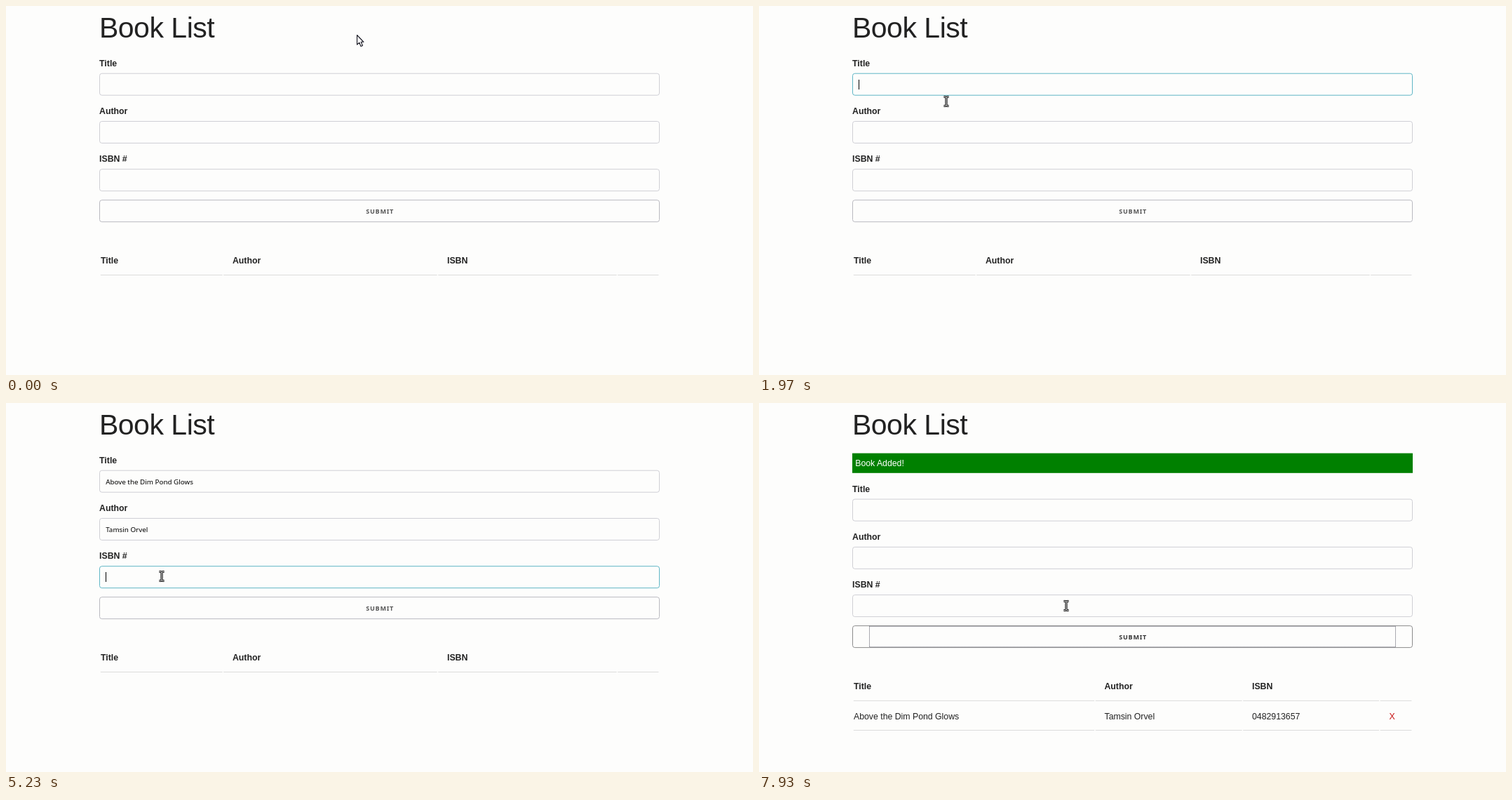
These frames come from a looping animation (1065 px wide and 526 px high, 8 s). An HTML page:

```html
<!DOCTYPE html>
<html lang="en">
<head>
<meta charset="utf-8">
<title>Book List</title>
<style>
  html, body { margin: 0; width: 100%; height: 100%; overflow: hidden; background: #fdfdfc; }
  svg { display: block; width: 1065px; height: 526px; }
  text { font: 12.29px "Liberation Sans", Arial, sans-serif; fill: #222; white-space: pre; }
  .heading { font-size: 40.96px; letter-spacing: -.45px; }
  .bold { font-weight: 700; }
  .value { font: 9.83px "Noto Sans", sans-serif; fill: #000; }
  .option { font: 10.1px "Noto Sans", sans-serif; }
  .button { font: 600 9.01px "Noto Sans", sans-serif; letter-spacing: .82px; }
  .box { fill: none; stroke: #cfcfd5; }
  .rule { stroke: #dcdcdc; fill: none; }
  .popup { filter: drop-shadow(0 2px 2.5px rgba(40, 40, 70, .6)); }
</style>
</head>
<body>
<svg id="stage" viewBox="0 0 1065 526" xmlns="http://www.w3.org/2000/svg"></svg>
<script>
const DURATION = 8000;
const PITCH = 68.25, SHIFT = 40.9;
const LEFT = 133.5, WIDTH = 798, FIELD_TOP = 96.2, FIELD_HEIGHT = 31;
const BUTTON_TOP = 276.7;
const ADDED = 7900, PRESSED = 7870;

const fields = [
  { label: 'Title', value: 'Above the Dim Pond Glows', focus: 830, open: 1430, close: 1930, filled: 2000 },
  { label: 'Author', value: 'Tamsin Orvel', focus: 3300, open: 3770, close: 4250, filled: 4270 },
  { label: 'ISBN #', value: '0482913657', focus: 5230, open: 5470, close: 6530, filled: 6530 }
];

// Moments at which the caret's blinking starts over
const caretResets = [830, 1400, 1930, 2000, 3300, 3730, 4270, 5230, 5400, 5900, 6530];

// Pointer moves: start, end, target x, target y
const moves = [
  [30, 760, 366.5, 107], [930, 1100, 303.5, 115], [1430, 1730, 267, 136],
  [2500, 3230, 249.5, 184.5], [3770, 4000, 240, 206], [4470, 5030, 222, 247],
  [5470, 5970, 238.5, 275], [6830, 7600, 438, 289]
];
const pointerStart = [500.5, 41.5];
// While it rests on a suggestion the pointer keeps its text shape
const heldBeam = [[1330, 2500], [3670, 4470], [5230, 6830]];

const stage = document.getElementById('stage');
const fieldTop = i => FIELD_TOP + i * PITCH;
const within = (t, from, to) => t >= from && t < to;
const show = (node, on) => node.setAttribute('visibility', on ? 'inherit' : 'hidden');

function add(parent, tag, attrs = {}, text = '') {
  const node = document.createElementNS(stage.namespaceURI, tag);
  for (const key in attrs) node.setAttribute(key, attrs[key]);
  node.textContent = text;
  return parent.appendChild(node);
}
const write = (parent, x, y, text, cls = '') => add(parent, 'text', { x, y, class: cls }, text);
const box = (parent, y) =>
  add(parent, 'rect', { x: LEFT, y, width: WIDTH, height: FIELD_HEIGHT, rx: 3.2, class: 'box' });

write(stage, 132.9, 45.3, 'Book List', 'heading');

const alertBar = add(stage, 'g');
add(alertBar, 'rect', { x: 133, y: 71.6, width: 799, height: 28.2, fill: '#008000' });
write(alertBar, 137.2, 90, 'Book Added!').style.fill = '#fff';

const page = add(stage, 'g');
fields.forEach((field, i) => {
  const y = fieldTop(i);
  write(page, 133.1, y - 10.4, field.label, 'bold');
  field.box = box(page, y);
  field.text = write(page, 142.2, y + 19.3, field.value, 'value');
});

const button = box(page, BUTTON_TOP);
const buttonText = write(page, 533.1, 296.3, 'SUBMIT', 'button');
buttonText.setAttribute('text-anchor', 'middle');
const focusRing = add(page, 'rect', {
  x: 157.5, y: BUTTON_TOP + .8, width: 750, height: 29.4,
  fill: 'none', stroke: '#445', 'stroke-width': .9, 'stroke-dasharray': '1 1'
});

function table(edges, row) {
  const group = add(page, 'g');
  const columns = edges.slice(0, -1);
  const rule = y => columns.forEach((x, i) =>
    add(group, 'path', { d: `M${x} ${y}H${edges[i + 1] - 1.6}`, class: 'rule' }));
  ['Title', 'Author', 'ISBN'].forEach((name, i) =>
    write(group, columns[i] + (i ? 12.8 : .2), 367, name, 'bold'));
  rule(383.5);
  if (row) {
    row.forEach((cell, i) => write(group, columns[i] + (i ? 12.8 : .2), 409.7, cell));
    group.lastChild.style.fill = '#c81414';
    rule(425.6);
  }
  return group;
}
const emptyTable = table([134.8, 310.2, 616.2, 872.2, 932]);
const filledTable = table([134.8, 479.7, 690.2, 885.6, 932], [...fields.map(f => f.value), 'X']);

const caret = add(page, 'rect', { width: 1, height: 14, fill: '#000' });

fields.forEach((field, i) => {
  const y = fieldTop(i) + 31.8;
  field.popup = add(page, 'g', { class: 'popup' });
  add(field.popup, 'rect', { x: LEFT, y: y + .4, width: WIDTH, height: 19, fill: '#fbfbfb', stroke: '#b9bcc6' });
  field.highlight = add(field.popup, 'rect', { x: 134.8, y: y + 1.6, width: 795.4, height: 16.6 });
  field.option = write(field.popup, 139, y + 13.7, field.value, 'option');
});

const pointer = add(stage, 'g', { 'stroke-linejoin': 'round' });
const shapes = {
  arrow: add(pointer, 'path', {
    d: 'M0 0V13.6L3.2 10.7L5.5 16L7.9 15L5.7 9.8H9.4Z', fill: '#fff', stroke: '#15151f', 'stroke-width': 1.1
  }),
  beam: add(pointer, 'g', { fill: 'none' }),
  hand: add(pointer, 'path', {
    d: 'M-1.4 8V.6Q0-1 1.4.6V5.4L6.6 6.6Q8.2 7.2 7.8 9L6.6 14.8H-1.2L-5 9.4Q-4.6 7.6-2.8 8.6L-1.4 10Z',
    fill: '#fff', stroke: '#15151f', 'stroke-width': 1.1
  })
};
const beamPath = 'M-3.6-6.5H-1.2L0-5.7L1.2-6.5H3.6M0-5.7V5.7M-3.6 6.5H-1.2L0 5.7L1.2 6.5H3.6';
add(shapes.beam, 'path', { d: beamPath, stroke: '#111', 'stroke-width': 3.2 });
add(shapes.beam, 'path', { d: beamPath, stroke: '#fff', 'stroke-width': .9 });

function pointerAt(t) {
  let [x, y] = pointerStart;
  for (const [from, to, toX, toY] of moves) {
    const p = Math.min(1, Math.max(0, (t - from) / (to - from)));
    const eased = p * p * (3 - 2 * p);
    x += (toX - x) * eased;
    y += (toY - y) * eased;
  }
  return [x, y];
}

function pointerShape(t, y) {
  const localY = t >= ADDED ? y - SHIFT : y;
  const over = top => within(localY, top, top + FIELD_HEIGHT);
  if (heldBeam.some(([from, to]) => within(t, from, to))) return 'beam';
  if (fields.some((_, i) => over(fieldTop(i)))) return 'beam';
  return over(BUTTON_TOP) ? 'hand' : 'arrow';
}

function render(t) {
  const added = t >= ADDED;
  const [x, y] = pointerAt(t);
  const shape = pointerShape(t, y);
  const focused = t >= PRESSED ? -1 : fields.filter(f => t >= f.focus).length - 1;

  page.setAttribute('transform', `translate(0 ${added ? SHIFT : 0})`);
  show(alertBar, added);
  show(emptyTable, !added);
  show(filledTable, added);

  fields.forEach((field, i) => {
    field.box.style.stroke = i === focused ? '#5fb6c6' : '';
    show(field.text, t >= field.filled && !added);
    show(field.popup, within(t, field.open, field.close));
    const hovered = y > fieldTop(i) + FIELD_HEIGHT;
    field.highlight.setAttribute('fill', hovered ? '#98b47a' : '#fbfbfb');
    field.option.style.fill = hovered ? '#fff' : '#222';
  });

  const active = shape === 'hand' || t >= PRESSED;
  button.style.stroke = active ? '#8c8c8c' : '#b9b9c0';
  buttonText.style.fill = active ? '#333' : '#555';
  show(focusRing, t >= PRESSED);

  const reset = caretResets.filter(start => t >= start).pop();
  show(caret, focused >= 0 && Math.floor((t - reset) / 500) % 2 === 0);
  if (focused >= 0) {
    const field = fields[focused];
    const offset = t >= field.filled ? field.text.getComputedTextLength() : 0;
    caret.setAttribute('x', Math.round(142 + offset));
    caret.setAttribute('y', Math.round(fieldTop(focused) + 8.6));
  }

  pointer.setAttribute('transform', `translate(${x.toFixed(1)} ${y.toFixed(1)})`);
  for (const name in shapes) show(shapes[name], name === shape);
}

const start = performance.now();
function tick() {
  render((performance.now() - start) % DURATION);
  requestAnimationFrame(tick);
}
tick();
</script>
</body>
</html>
```
